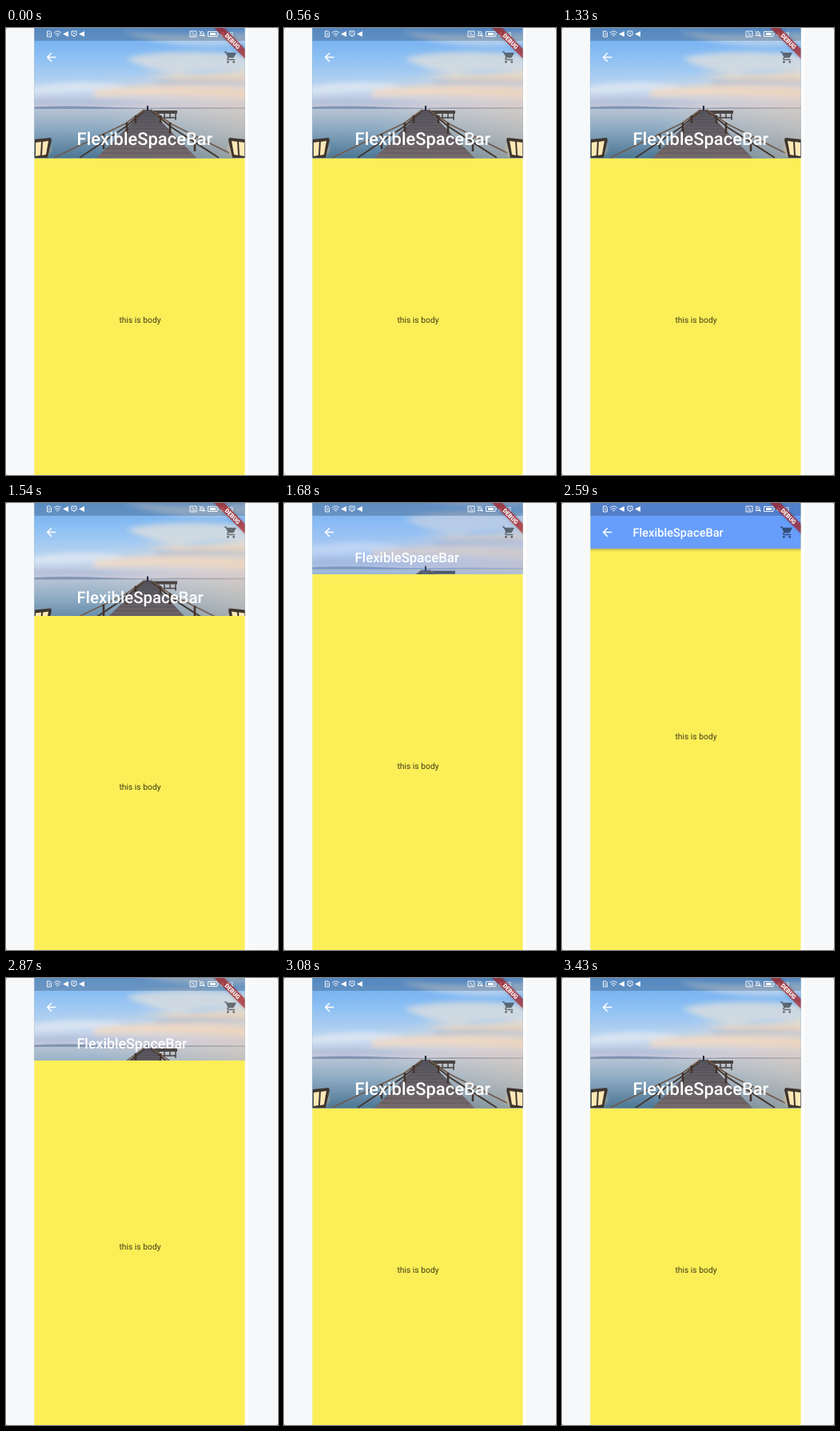
An HTML page for the animation above (3500 ms loop, 340 by 558 pixels).

```html
<!DOCTYPE html>
<html lang="en">
<head>
<meta charset="utf-8">
<title>Collapsing header</title>
<style>
  html, body { margin: 0; width: 100%; height: 100%; overflow: hidden; background: #777; }
  #stage { display: block; width: 340px; height: 558px; border-radius: 2px; background: #f6f8fa; }
  text { font-family: Roboto, sans-serif; text-rendering: geometricPrecision; }
</style>
</head>
<body>
<svg id="stage" viewBox="0 0 340 558">
  <defs>
    <linearGradient id="sky" x2="0" y2="1">
      <stop stop-color="#68a9f0"/>
      <stop offset=".35" stop-color="#8cbff3"/>
      <stop offset=".75" stop-color="#bdd6f0"/>
      <stop offset="1" stop-color="#cfc8d8"/>
    </linearGradient>
    <linearGradient id="sea" x2="0" y2="1">
      <stop stop-color="#b6c3d3"/>
      <stop offset=".4" stop-color="#8caac3"/>
      <stop offset="1" stop-color="#4b7593"/>
    </linearGradient>
    <linearGradient id="warm">
      <stop offset=".3" stop-color="#f3d9bd" stop-opacity="0"/>
      <stop offset="1" stop-color="#ecd0b8" stop-opacity=".5"/>
    </linearGradient>
    <linearGradient id="deck" x2="0" y2="1">
      <stop stop-color="#575660"/>
      <stop offset="1" stop-color="#75696a"/>
    </linearGradient>
    <linearGradient id="shade" x2="0" y2="1">
      <stop stop-opacity=".2"/>
      <stop offset="1" stop-opacity="0"/>
    </linearGradient>
    <filter id="soft" x="-50%" y="-50%" width="200%" height="200%"><feGaussianBlur stdDeviation="3"/></filter>
    <filter id="glow" x="-50%" y="-50%" width="200%" height="200%"><feGaussianBlur stdDeviation="2"/></filter>
    <clipPath id="screen"><path d="M35.500 0H298.500V558H35.500z"/></clipPath>
    <g id="lamp">
      <path d="M0 139L20 137L21 140L16 162H0z" fill="#3f352f"/>
      <path d="M1 143L8 142L7 159L1 160zM10 142L17 141L14 158L9 159z" fill="#ffe9b5"/>
    </g>
  </defs>

  <path d="M298 0H302.500V558H298z" fill="#fff"/>
  <g clip-path="url(#screen)">
    <path d="M35 0H299V558H35z" fill="#fcee57"/>
    <text id="body" x="167.5" font-size="10.3" text-anchor="middle" opacity=".75">this is body</text>
    <rect id="shadow" x="35" y="57" width="264" height="4" fill="url(#shade)"/>

    <svg id="header" x="35" width="264">
      <path d="M0 0H264V163H0z" fill="#679efb"/>
      <g id="photo">
        <path d="M35 0H299V102H35z" fill="url(#sky)"/>
        <g filter="url(#soft)">
          <path d="M150 38Q205 24 305 34V54Q250 50 215 58Q175 52 150 38z" fill="#e6e2dc" opacity=".7"/>
          <path d="M165 56Q215 62 305 52V64Q230 72 165 56z" fill="#f2ddc2" opacity=".8"/>
          <path d="M110 77Q200 66 305 76V88Q220 83 110 86z" fill="#f2dac4" opacity=".85"/>
          <path d="M30 74Q90 62 150 72Q120 80 30 82z" fill="#e6eaf2" opacity=".7"/>
          <path d="M145 4Q220 12 305 5V20Q210 30 145 4z" fill="#cbdcee" opacity=".7"/>
          <path d="M185 67Q240 60 300 65V70Q240 69 190 72z" fill="#9fb4d0" opacity=".7"/>
          <path d="M30 90Q80 86 150 91T305 92V96H30z" fill="#a6b8d4" opacity=".7"/>
        </g>
        <path d="M35 98.500Q75 96.500 120 98.500T210 99H299V101.500H35z" fill="#8295b3"/>
        <path d="M35 101H299V163H35z" fill="url(#sea)"/>
        <path d="M35 60H299V163H35z" fill="url(#warm)"/>
        <path d="M183 103H214V107H183z" fill="#4a4443"/>
        <path d="M185 107V114M191 107V113M198 107V113M205 107V113M212 107V115M184 112H213" stroke="#4a4443" stroke-width="1.5"/>
        <path d="M174 102H180L239 163H112z" fill="url(#deck)"/>
        <path id="planks" fill="none" stroke="#454249" stroke-width=".7" opacity=".6"/>
        <path d="M173 103L150 123L92 162M181 103L207 124L266 162" fill="none" stroke="#43372f" stroke-width="2"/>
        <path d="M173 102L150 119L60 162M181 102L207 120L279 156" fill="none" stroke="#6f5a4c" stroke-width="1.6"/>
        <path d="M122 132V151M151 118V132M162 109V119M193 109V119M205 118V132M236 134V154" stroke="#43342c" stroke-width="2.6"/>
        <path d="M176 97H178V103H176z" fill="#252c3a"/>
        <g filter="url(#glow)" fill="#ffd98d" opacity=".5"><circle cx="47" cy="151" r="9"/><circle cx="287" cy="151" r="9"/></g>
        <use href="#lamp" x="36"/>
        <use href="#lamp" transform="matrix(-1 0 0 1 299 0)"/>
      </g>
    </svg>

    <text id="title" font-size="14.6" font-weight="500" fill="#fff">FlexibleSpaceBar</text>
    <path d="M35 0H299V16H35z" opacity=".2"/>
    <g fill="none" stroke="#fff" stroke-width=".9">
      <path d="M51.500 4H55L56.500 5.500V11H51.500zM54 6V9.500"/>
      <path d="M60 6Q64.500 2 69 6M61.500 8Q64.500 5.500 67.500 8M63 10Q64.500 8.500 66 10"/>
      <path d="M82 4H88V9H86L85 11L84 9H82zM84 6.500H86"/>
      <path d="M230 4H238V11H230zM232 6Q235.500 6 235.500 10M232 8.500L233.500 10"/>
      <path d="M242 9.500H248L247 8V6Q245 2.500 243 6V8zM241.500 3.500L248.500 11"/>
      <path d="M252.500 4.500H264V10.500H252.500zM265.500 6.500V8.500"/>
    </g>
    <path d="M71 7.500L78 4V11zM91 7.500L98 4V11zM255 6H262V9H255z" fill="#fff"/>
    <text x="268" y="10.800" font-size="8.500" fill="#fff">4:33</text>

    <path transform="translate(47.700 27.800) scale(.73)" fill="#fff" d="M20 11H7.830l5.590-5.590L12 4l-8 8 8 8 1.410-1.410L7.830 13H20z"/>
    <path transform="translate(272.300 27.800) scale(.73)" opacity=".5" d="M1 2V4H3L6.600 11.600L5.250 14Q4.600 17 7 17H19V15H7.400L7.200 14.600L8.100 13H15.550Q16.800 13 17.300 12L20.900 5.500Q21.400 4 20 4H5.200L4.270 2zM5 20a2 2 0 1 0 4 0a2 2 0 1 0-4 0M15 20a2 2 0 1 0 4 0a2 2 0 1 0-4 0"/>

    <g transform="translate(299 0) rotate(45)">
      <path d="M-30 18.500H30V27.300H-30z" opacity=".2" filter="url(#glow)"/>
      <path d="M-30 18.500H30V27.300H-30z" fill="#b71c1c" opacity=".66"/>
      <text x=".5" y="25.500" font-size="7.400" font-weight="900" text-anchor="middle" fill="#fff">DEBUG</text>
    </g>
  </g>
</svg>
<script>
  const LOOP = 3500, STEP = 70;
  const EXPANDED = 162.5, COLLAPSED = 57, RANGE = EXPANDED - COLLAPSED;
  const FADE_START = 1 - 41 / RANGE;
  const $ = id => document.getElementById(id);
  const set = (id, attrs) => {
    for (const name in attrs) $(id).setAttribute(name, attrs[name]);
  };
  const clamp = x => Math.min(1, Math.max(0, x));
  const ease = (t, start, end) => (1 - Math.cos(Math.PI * clamp((t - start) / (end - start)))) / 2;

  let planks = '';
  for (let i = 1; i < 16; i++) {
    const d = 60 * (i / 16) ** 1.6;
    planks += `M${174 - d * 1.02} ${102 + d}H${180 + d * .97}`;
  }
  set('planks', { d: planks });

  // A short drag and release, then a full collapse and return.
  const scrollAt = t =>
    75 * (ease(t, 560, 910) - ease(t, 910, 1260)) +
    147 * (ease(t, 1400, 1960) - ease(t, 2640, 3050));

  function draw(t) {
    const scroll = scrollAt(t);
    const height = Math.max(COLLAPSED, EXPANDED - scroll);
    const progress = (EXPANDED - height) / RANGE;
    const scale = 1.5 - progress / 2;
    set('header', { height });
    set('photo', {
      transform: `translate(-35 ${-progress * RANGE / 4})`,
      opacity: 1 - clamp((progress - FADE_START) / (1 - FADE_START))
    });
    set('title', { transform: `translate(88.6 ${height - 11 - 3.56 * scale}) scale(${scale})` });
    set('body', { y: 368.4 - scroll / 2 });
    set('shadow', { opacity: scroll > RANGE ? 1 : 0 });
  }

  function frame() {
    const t = performance.now() % LOOP;
    draw(Math.floor(t / STEP) * STEP);
    requestAnimationFrame(frame);
  }
  frame();
</script>
</body>
</html>
```
